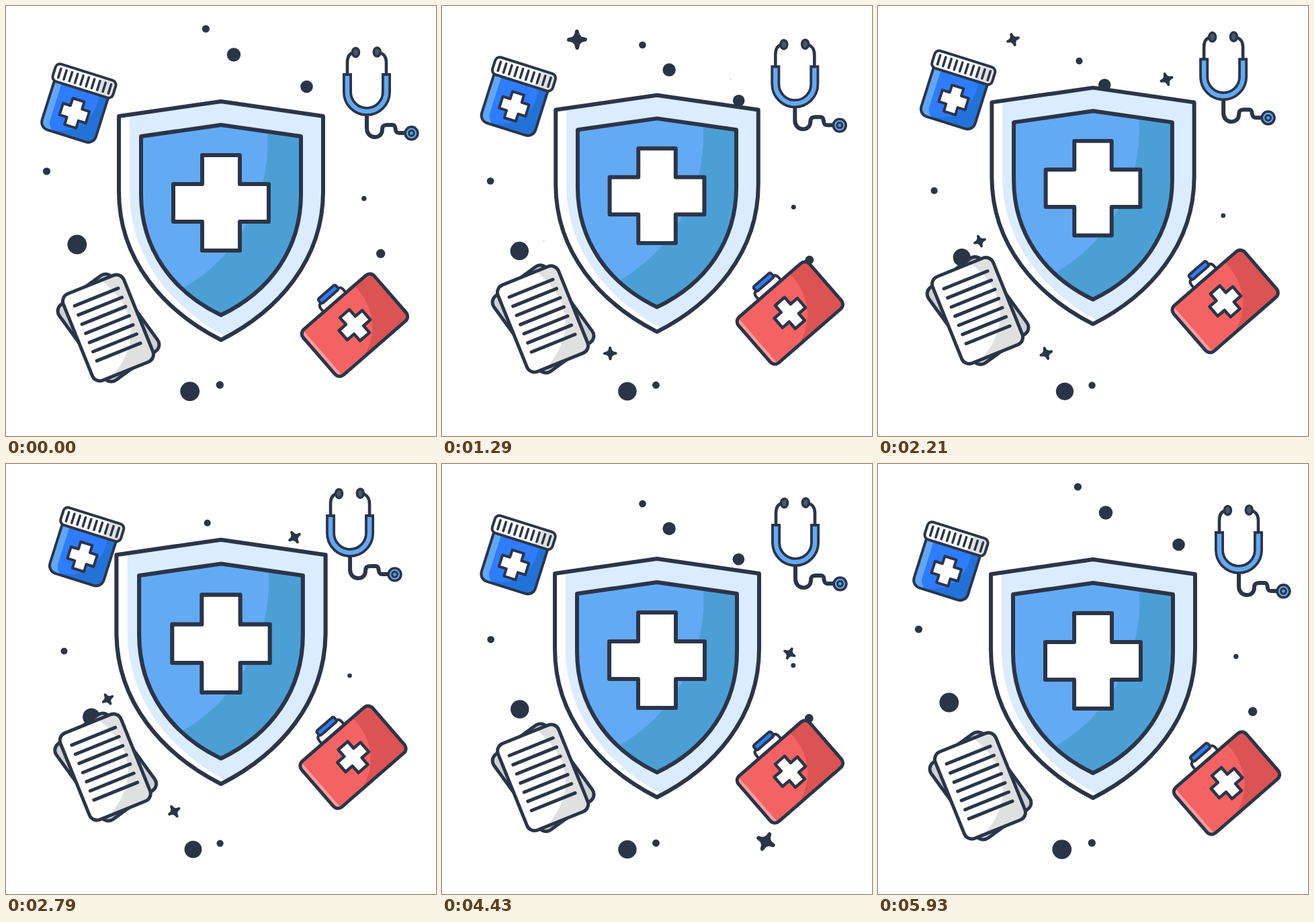
An HTML page for the animation above (6 s loop, 640 px wide and 640 px high).

```html
<!DOCTYPE html>
<html lang="en">
<head>
<meta charset="utf-8">
<title>Health shield</title>
<style>
  html, body { margin: 0; width: 100%; height: 100%; overflow: hidden; background: #fff; }
  svg { display: block; width: 100vw; height: 100vh; }
  .line { stroke: #2b3548; stroke-linejoin: round; stroke-linecap: round; }
  .none { fill: none; }
  .ink { fill: #2b3548; }
</style>
</head>
<body>
<svg viewBox="0 0 640 640">
  <defs>
    <path id="outer" d="M320 142L472 164V276C472 378 405 454 320 497C235 454 168 378 168 276V164Z"/>
    <path id="inner" d="M320 177L439 194V280C439 361 393 425 320 460C247 425 201 361 201 280V194Z"/>
    <rect id="cap" x="-47" y="-13.5" width="94" height="27" rx="7"/>
    <rect id="jar" x="-42.5" y="2" width="84" height="84" rx="12"/>
    <rect id="page" x="-48.6" y="-69.5" width="97.2" height="139" rx="12"/>
    <rect id="case" x="-70" y="-45" width="140" height="90" rx="9"/>
    <clipPath id="outerClip"><use href="#outer"/></clipPath>
    <clipPath id="innerClip"><use href="#inner"/></clipPath>
    <clipPath id="capClip"><use href="#cap"/></clipPath>
    <clipPath id="jarClip"><use href="#jar"/></clipPath>
    <clipPath id="pageClip"><use href="#page"/></clipPath>
    <clipPath id="caseClip"><use href="#case"/></clipPath>
  </defs>

  <g id="dots" class="ink"></g>
  <g id="stars" class="ink"></g>

  <g id="shield">
    <use href="#outer" fill="#fff"/>
    <path clip-path="url(#outerClip)" fill="#daecfd" d="M184 140V276C184 378 251 454 336 497H480V140Z"/>
    <use href="#outer" class="line none" stroke-width="6"/>
    <use href="#inner" fill="#63aaf4"/>
    <path clip-path="url(#innerClip)" fill="#4c9fd5" d="M388 175A250 250 0 0 1 262 421L320 470H450V175Z"/>
    <use href="#inner" class="line none" stroke-width="6"/>
    <path class="line" fill="#fff" stroke-width="6" d="M292 222h56v43h43v56h-43v43h-56v-43h-43v-56h43z"/>
  </g>

  <g id="bottle">
    <g transform="translate(116.5 111.5) rotate(17.5)">
      <g clip-path="url(#jarClip)">
        <use href="#jar" fill="#2272d8"/>
        <path fill="#2e7cff" d="M-43 0H25C36 40 22 76-22 84H-43Z"/>
        <path fill="#61a7f5" d="M-43 0H-31V72Q-30 80-22 86H-43Z"/>
      </g>
      <use href="#jar" class="line none" stroke-width="4"/>
      <use href="#cap" fill="#fff"/>
      <path clip-path="url(#capClip)" fill="#dfe0e0" d="M24-14H48V14H18Q25 0 24-14Z"/>
      <use href="#cap" class="line none" stroke-width="4"/>
      <path id="ridges" class="line none" stroke-width="3.6"/>
      <path class="line cross" data-size="20.5 9" fill="#fff" stroke-width="4" transform="translate(.5 50.2)"/>
    </g>
  </g>

  <g id="scope">
    <path class="line none" stroke-width="4.6" d="M508 101V84C508 74 513 70 518 69M566 101V84C566 74 560 70 555 69"/>
    <ellipse class="line" fill="#4d5666" stroke-width="3.5" cx="520.5" cy="69" rx="5" ry="6.6"/>
    <ellipse class="line" fill="#4d5666" stroke-width="3.5" cx="552.3" cy="68.5" rx="5" ry="6.6"/>
    <path class="line none" stroke-width="6" d="M537 163V182C537 199 560 199 560 184C560 178 563 177 567 177H575C583 177 576 189 585 189H594"/>
    <path fill="none" stroke="#2b3548" stroke-width="14" d="M508 100V128A29 29 0 0 0 566 128V100"/>
    <path fill="none" stroke="#63aaf4" stroke-width="6.4" d="M508 104V128A29 29 0 0 0 566 128V104"/>
    <circle class="line" fill="#63aaf4" stroke-width="3.6" cx="603.5" cy="189.3" r="9.4"/>
    <circle class="line" fill="#4c9fd5" stroke-width="3" cx="603.5" cy="189.3" r="4"/>
  </g>

  <g id="papers">
    <use href="#page" class="line" fill="#ced2d5" stroke-width="5" transform="translate(152.5 479) rotate(-36)"/>
    <g transform="translate(152 479) rotate(-22)">
      <use href="#page" fill="#fff"/>
      <path clip-path="url(#pageClip)" fill="#dfe0e0" d="M15-72C46-25 46 38-26 71H60V-72Z"/>
      <use href="#page" class="line none" stroke-width="5"/>
      <path id="rows" class="line none" stroke-width="5"/>
    </g>
  </g>

  <g id="kit">
    <g transform="translate(519 475) rotate(-41)">
      <path class="line" fill="#fff" stroke-width="4" d="M-22-45V-51Q-22-58-15-58H15Q22-58 22-51V-45"/>
      <rect class="line" fill="#2e7cff" stroke-width="4" x="-16.5" y="-65" width="34" height="9" rx="2.5"/>
      <g clip-path="url(#caseClip)">
        <use href="#case" fill="#f46363"/>
        <path fill="#dc5354" d="M38-46C41 2 15 36-28 46H80V-46Z"/>
        <path fill="#fa9c9c" d="M-71-46H-63V46H-71Z"/>
      </g>
      <use href="#case" class="line none" stroke-width="5"/>
      <path class="line cross" data-size="22.8 9.3" fill="#fff" stroke-width="4.5"/>
    </g>
  </g>
</svg>
<script>
const LOOP = 6000;
const $ = id => document.getElementById(id);

function add(parent, tag, attrs) {
  const el = document.createElementNS('http://www.w3.org/2000/svg', tag);
  for (const k in attrs) el.setAttribute(k, attrs[k]);
  return parent.appendChild(el);
}

const repeat = (n, fn) => Array.from({ length: n }, (_, i) => fn(i)).join('');
$('ridges').setAttribute('d', repeat(10, i => `M${-38.5 + i * 8.7} -7v14`));
$('rows').setAttribute('d', repeat(7, i => `M-34 ${-49 + i * 14.7}h70`));

for (const el of document.querySelectorAll('.cross')) {
  const [a, w] = el.dataset.size.split(' ').map(Number), s = a - w;
  el.setAttribute('d', `M${-w} ${-a}h${2 * w}v${s}h${s}v${2 * w}h${-s}v${s}h${-2 * w}v${-s}h${-s}v${-2 * w}h${s}z`);
}

// x, y, radius, drift x, drift y
const dots = [
  [297.4, 34, 5.6, 2.3, 53.7], [339, 72.5, 10.2, -2, 50.6],
  [447.5, 120, 9.3, -13, 46.5], [60.5, 246, 5.6, 26, 32.5],
  [105.8, 355, 14.4, 21.3, 21.5], [532.8, 286.5, 3.7, -21.3, 28.5],
  [557.7, 368.5, 6.7, -24.2, 21.3], [273.7, 573.6, 14.4, 4.8, 0],
  [318.3, 564, 5.7, 0.3, 0.6]
].map(d => ({ d, el: add($('dots'), 'circle', {}) }));

// x, y, radius, appears, vanishes
const starShape = 'M0-8.5Q1-3.2 2.6-2.6Q3.2-1 8.5 0Q3.2 1 2.6 2.6Q1 3.2 0 8.5Q-1 3.2-2.6 2.6Q-3.2 1-8.5 0Q-3.2-1-2.6-2.6Q-1-3.2 0-8.5Z';
const stars = [
  [201, 50, 15, 350, 2400], [250.3, 517, 10.3, 400, 3150],
  [151.5, 350, 9.8, 1250, 3950], [429.5, 109, 10.5, 1250, 3950],
  [517.3, 282, 9.8, 3000, 4950], [482, 562, 15, 3000, 5100]
].map(s => ({ s, el: add($('stars'), 'path', { d: starShape, class: 'line', 'stroke-width': 4 }) }));

const drifts = { bottle: [11.8, -21.6], scope: [-25, -25], papers: [-4.3, -28], kit: [-2.5, -38.8] };

const shieldY = [[0, 0], [790, -6], [1790, -16], [2650, -26], [3500, -10], [4430, -1], [5100, 0], [LOOP, 0]];
const shieldScale = [[0, 1], [1100, 1], [1790, .957], [2650, 1.027], [3300, 1], [LOOP, 1]];

const clamp = v => Math.min(1, Math.max(0, v));
const smooth = v => { v = clamp(v); return v * v * (3 - 2 * v); };
const swing = (t, peak, end) => t < peak ? smooth(t / peak) : smooth((end - t) / (end - peak));

// Monotone cubic through [time, value] keys
function curve(keys, t) {
  let i = 0;
  while (i < keys.length - 2 && t >= keys[i + 1][0]) i++;
  const slope = k => k < 0 || k > keys.length - 2 ? 0
    : (keys[k + 1][1] - keys[k][1]) / (keys[k + 1][0] - keys[k][0]);
  const tangent = k => {
    const a = slope(k - 1), b = slope(k);
    return a * b <= 0 ? 0 : 2 * a * b / (a + b);
  };
  const [t0, v0] = keys[i], [t1, v1] = keys[i + 1];
  const h = t1 - t0, u = (t - t0) / h, w = 1 - u;
  return v0 + (v1 - v0) * smooth(u) + h * u * w * (w * tangent(i) - u * tangent(i + 1));
}

function draw(t) {
  const lift = swing(t, 2700, 5900);
  for (const id in drifts) {
    const [x, y] = drifts[id];
    $(id).setAttribute('transform', `translate(${x * lift} ${y * lift})`);
  }

  const fall = swing(t, 2780, 5950);
  for (const { d: [x, y, r, dx, dy], el } of dots) {
    el.setAttribute('cx', x + dx * fall);
    el.setAttribute('cy', y + dy * fall);
    el.setAttribute('r', r * (1 - .1 * fall));
  }

  const angle = 45 - (t - 3500) * .02;
  for (const { s: [x, y, r, from, to], el } of stars) {
    const size = smooth((t - from) / 300) * smooth((to - t) / 300);
    el.setAttribute('visibility', size > 0 ? 'visible' : 'hidden');
    el.setAttribute('transform', `translate(${x} ${y}) rotate(${angle}) scale(${Math.max(size, .001) * r / 10.5})`);
  }

  $('shield').setAttribute('transform',
    `translate(320 ${319.5 + curve(shieldY, t)}) scale(${curve(shieldScale, t)}) translate(-320 -319.5)`);
}

const start = performance.now();
function tick() {
  draw((performance.now() - start) % LOOP);
  requestAnimationFrame(tick);
}
tick();
</script>
</body>
</html>
```
